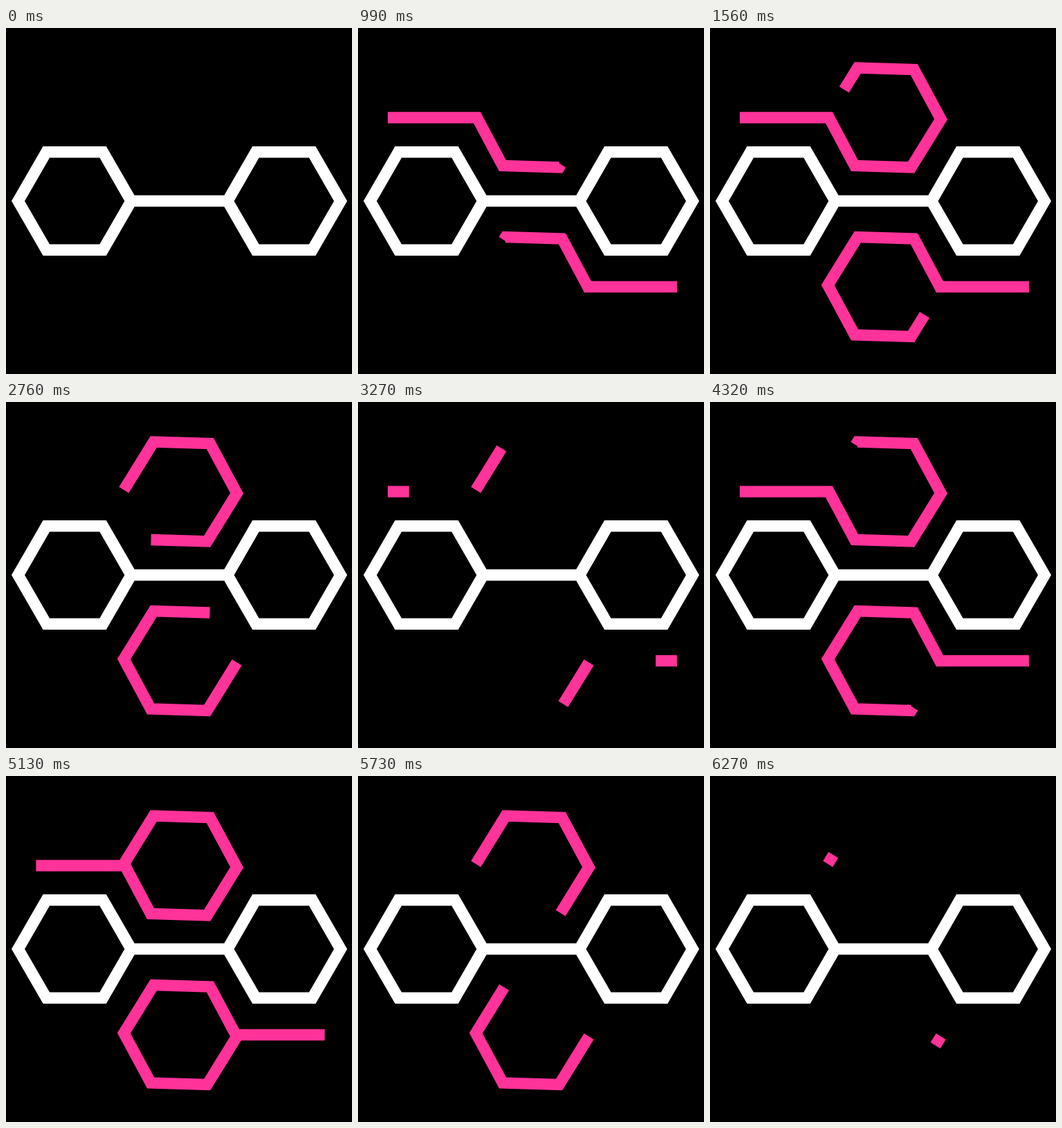
An HTML page for the animation above (6300 ms loop, 500 by 500 pixels).

```html
<!DOCTYPE html>
<html lang="en">
<head>
<meta charset="utf-8">
<style>
  html, body { margin: 0; height: 100%; overflow: hidden; background: #000; }
  svg { display: block; width: 100vw; height: 100vh; }
  path { fill: none; stroke-width: 16.5; stroke-miterlimit: 10; }
</style>
</head>
<body>
<svg viewBox="0 0 500 500">
  <path id="frame" stroke="#fff"/>
  <g id="strands" stroke="#f39">
    <path class="strand"/>
    <path class="strand"/>
  </g>
  <use href="#strands" transform="rotate(180 252 251.75)"/>
</svg>
<script>
const STEP = 30, LOOP = 6300, REPEAT = 2850;
const DRAW = { start: 199.5, duration: 1629 };
const ERASE = { start: 2261.4, duration: 1278 };
const RADIUS = 81.7, TILT = 1.7;

const corner = (cx, cy, degrees) => {
  const a = degrees * Math.PI / 180;
  return [cx + RADIUS * Math.cos(a), cy + RADIUS * Math.sin(a)];
};
const corners = (cx, cy, from, turn) =>
  Array.from({ length: 6 }, (_, i) => corner(cx, cy, from + turn * i));
const toPath = points => 'M' + points.join('L');

document.getElementById('frame').setAttribute('d',
  toPath(corners(99.2, 250, 0, 60)) + 'Z' +
  toPath(corners(401.8, 250, 0, 60)) + 'Z' +
  'M181 250H320');

const strands = [...document.querySelectorAll('.strand')];
const route = toPath([[43, 129.5], [172, 129.5], ...corners(252, 129.5, 120 + TILT, -60)]);
strands.forEach(strand => strand.setAttribute('d', route));
const length = strands[0].getTotalLength();

const progress = (time, { start, duration }) => {
  const p = Math.min(1, Math.max(0, (time - start) / duration));
  return p * p * (3 - 2 * p);
};

function render() {
  const time = Math.floor(performance.now() % LOOP / STEP) * STEP;
  strands.forEach((strand, i) => {
    const local = time - i * REPEAT;
    const head = length * progress(local, DRAW);
    const tail = length * progress(local, ERASE);
    strand.setAttribute('visibility', head > tail ? 'visible' : 'hidden');
    strand.setAttribute('stroke-dasharray', `0 ${tail} ${head - tail} 2000`);
  });
  requestAnimationFrame(render);
}
render();
</script>
</body>
</html>
```
